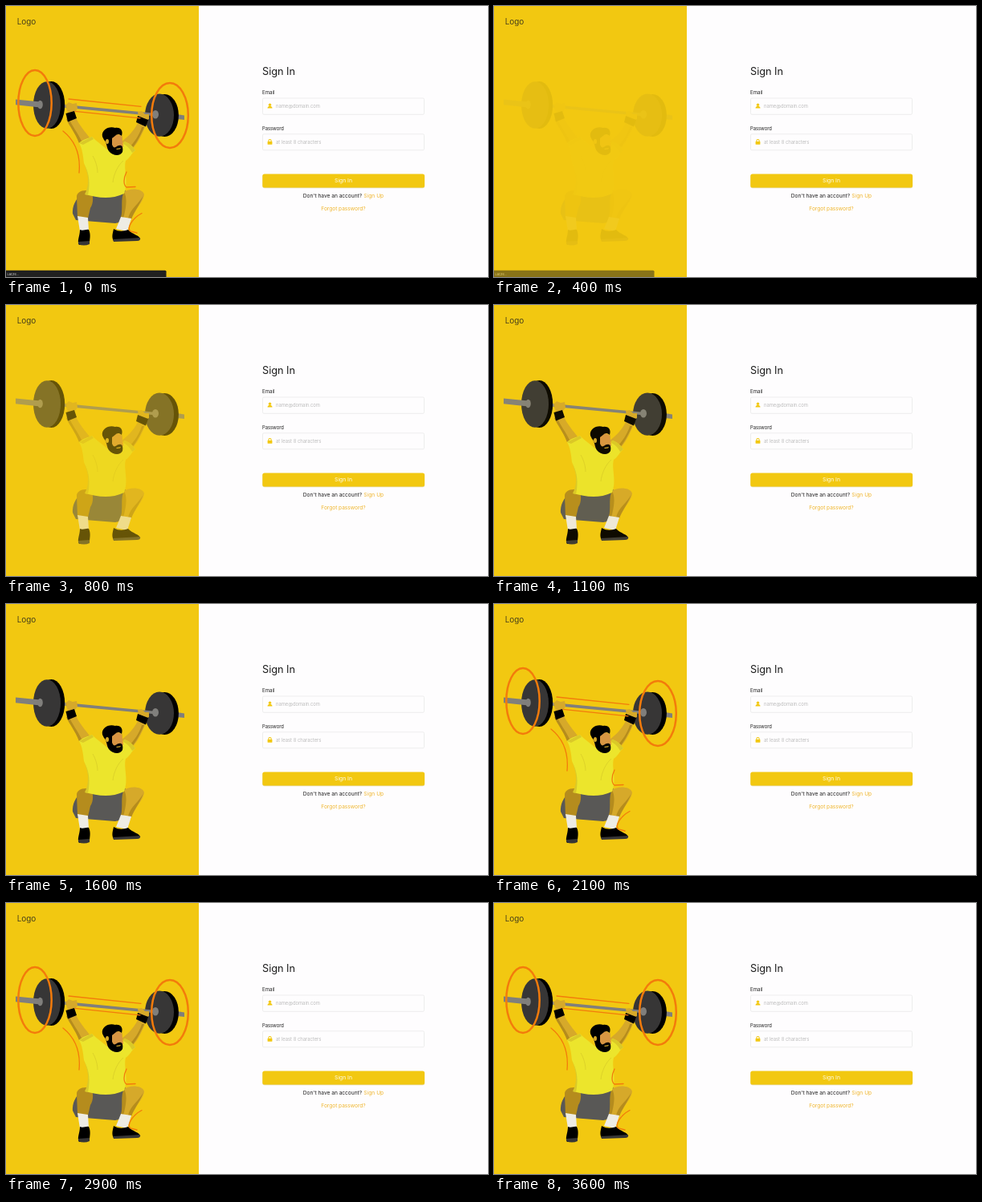
Write an HTML page that moves like this. It is 600 px wide and 338 px high and loops after 3.7 s.

```html
<!DOCTYPE html>
<html lang="en">
<head>
<meta charset="utf-8">
<title>Sign In</title>
<style>
  html, body { margin: 0; width: 100%; height: 100%; overflow: hidden; background: #fefdfe; }
  svg { display: block; width: 100vw; height: 100vh; }
  text { font-family: Inter, "Open Sans", sans-serif; fill: #1d1d1d; }
  .hint { fill: #bcbcbc; font-size: 5.85px; }
  .link { fill: #efb52b; }
  .field { fill: #fefdfe; stroke: #ebebeb; stroke-width: .9; }
  .gold { fill: #f2c811; }
  .skin { fill: #d6a92a; }
  .shade { fill: #b58c1d; }
  .plate { fill: #373636; }
  .steel { fill: #807f7c; }
  .sock { fill: #eeece4; }
  #effort { fill: none; stroke: #f37b0b; stroke-width: 1.3; stroke-linecap: round; }
  #effort ellipse { stroke-width: 2.5; }
</style>
</head>
<body>
<svg viewBox="0 0 600 338" preserveAspectRatio="none">
  <rect width="600" height="338" fill="#fefdfe"/>
  <rect class="gold" width="240" height="338"/>
  <text x="13.7" y="23.2" font-size="10" font-weight="300">Logo</text>

  <g id="lifter">
    <!-- barbell -->
    <path class="steel" d="M213 135 222 136.5V142L213 141Z"/>
    <ellipse cx="56.5" cy="123.5" rx="16.7" ry="29.5"/>
    <ellipse class="plate" cx="51" cy="123.5" rx="17" ry="29.2"/>
    <path class="steel" d="M12 116.5 40 119.2V126.2L12 123.2Z"/>
    <ellipse class="steel" cx="42.5" cy="123" rx="3.3" ry="5.2"/>
    <ellipse cx="197.5" cy="136.5" rx="17.4" ry="26.5"/>
    <ellipse class="plate" cx="191" cy="136.2" rx="18" ry="26.6"/>
    <path class="steel" d="M73 123 185 133.7V137.2L73 126.8Z"/>
    <ellipse class="steel" cx="186" cy="135.3" rx="4" ry="5.2"/>
    <!-- arms -->
    <path class="skin" d="M75 139C79 148 86 157 91 171L106 167C99 157 91 149 87 139Z"/>
    <path class="skin" d="M164 146C159 156 152 163 144 169L155 181C162 174 169 162 174 148Z"/>
    <path class="shade" d="M75 141C79 150 86 158 91 171L95 170C89 158 82 149 78 140ZM172 151C167 163 161 173 155 180L152 178C160 170 166 161 169 151Z"/>
    <path class="skin" d="M74 124 78 120 83 122 88 121 89 128 86 132 77 133ZM164 132 169 131 173 135 178 135 178 141 174 143 165 139Z"/>
    <path d="M74.5 134 85 131 88 140 77 144.5ZM164 137 177 142 174 150.5 162 145Z"/>
    <!-- legs and shorts -->
    <path fill="#595856" d="M98 231C88 238 82 249 83 259L87 267 111 269 136 271C148 269 156 261 158 247L147 228Z"/>
    <path class="shade" d="M106 231C96 228 88 232 88 238L89 264 102 265 105 252C109 246 109 237 106 231Z"/>
    <path class="skin" d="M147 232C153 227 170 227 172 235C171 244 161 253 156 266L143 264C147 253 143 243 147 232Z"/>
    <path class="shade" d="M147 232C151 239 150 250 146 265L143 264C146 252 142 241 147 232ZM171 236C168 246 160 255 156 266L152 265C155 252 165 248 171 236Z"/>
    <path class="sock" d="M89 262 102 264 103 280 92 281ZM143 263 156 265 151 281 137 278Z"/>
    <path d="M92 279C96 281 100 278 103 279C106 285 104 291 104 296L91 298C88 293 92 287 92 279ZM134 278C141 282 146 281 152 279C157 285 167 286 167 291L134 293C131 288 133 283 134 278Z"/>
    <path class="plate" d="M90 294 104 293V297Q97 300 90 297ZM133 291 167 289Q168 293 163 293L134 294Z"/>
    <!-- shirt -->
    <path fill="#ece52c" d="M91 171C96 166 103 165 107 163C112 168 120 174 126 179L145 178 147 169C152 170 158 175 161 180C156 184 154 190 149 193C146 204 153 219 147 234C130 242 113 239 99 235C106 222 102 207 97 196C96 187 95 178 91 171Z"/>
    <path fill="#dac928" d="M91 171 107 163 109 166 96 173ZM147 169C152 170 158 175 161 180L157 183C154 177 150 174 146 172ZM97 197C104 208 105 222 102 236L98 235C105 221 102 207 97 197Z"/>
    <path fill="none" stroke="#d8cd29" stroke-width=".8" d="M146 193C139 199 134 210 133 220M108 187C112 194 114 202 114 208"/>
    <!-- head -->
    <path class="skin" d="M122 165C126 159 142 154 145 163L145 179C142 188 131 184 126 178Z"/>
    <path fill="#d79543" d="M131 163C136 159 143 160 144 164L146 176 136 178 130 172Z"/>
    <path d="M120 163C118 154 129 149 136 152C143 151 146 156 144 162C138 157 136 163 132 165L132 173C135 180 137 174 141 174C145 173 146 178 145 182C142 188 133 187 128 181C125 177 126 170 122 167Z"/>
    <ellipse class="skin" cx="126" cy="169" rx="2" ry="3"/>
    <path class="skin" d="M137 178 143 177 142 178.5 138 179Z"/>
  </g>

  <g id="effort">
    <ellipse cx="36" cy="121" rx="20.7" ry="41"/>
    <ellipse cx="204" cy="136.5" rx="22.8" ry="40.5"/>
    <path d="M78 116 168 125.3M86 131.3 167 139.8M71 156C86 168 93 186 91 208M150 207C146 215 146 223 150 226L161 225.5M169 258.5C157 265 150 277 155 281L163 283"/>
  </g>

  <text x="319" y="86" font-size="12.7">Sign In</text>
  <text x="319" y="109.6" font-size="6.1">Email</text>
  <rect class="field" x="319.5" y="115" width="201" height="20.3" rx="1.5"/>
  <path class="gold" d="M325.5 127.5C325.5 123.8 331.5 123.8 331.5 127.5Z"/>
  <circle class="gold" cx="328.5" cy="123.2" r="1.7"/>
  <text class="hint" x="336" y="127.2">name@domain.com</text>
  <text x="319" y="154.5" font-size="5.8">Password</text>
  <rect class="field" x="319.5" y="159.8" width="201" height="20" rx="1.5"/>
  <rect class="gold" x="325.6" y="169" width="5.8" height="3.8" rx=".6"/>
  <path d="M326.9 169.3V168C326.9 166 330.1 166 330.1 168V169.3" fill="none" stroke="#f2c811" stroke-width="1.1"/>
  <text class="hint" x="336" y="172">at least 8 characters</text>
  <rect x="319.3" y="210" width="201.8" height="17.3" rx="2.5" fill="#e6dcb0"/>
  <rect class="gold" x="319.3" y="209.5" width="201.8" height="17" rx="2.5"/>
  <text x="420" y="220.4" font-size="6.8" text-anchor="middle" style="fill:#fffdf0">Sign In</text>
  <text x="369.8" y="239.2" font-size="6.6">Don't have an account?</text>
  <text class="link" x="445.3" y="239.2" font-size="6.7">Sign Up</text>
  <text class="link" x="420" y="254.6" font-size="6.55" text-anchor="middle">Forgot password?</text>

  <g id="status">
    <path fill="#202020" d="M0 329.8H198Q199.5 329.8 199.5 331.3V338H0Z"/>
    <text x="1.5" y="335.6" font-size="4" style="fill:#d8d8d8">Lacze...</text>
  </g>
</svg>
<script>
  const LOOP = 3700, STEP = 100, RELOAD = 250;
  const [lifter, effort, status_] = ["lifter", "effort", "status"].map(id => document.getElementById(id));

  const ramp = (t, from, to) => Math.min(1, Math.max(0, (t - from) / (to - from)));
  const ease = u => u * u * (3 - 2 * u);

  function draw(now) {
    const t = Math.floor(now % LOOP / STEP) * STEP;
    const before = t < RELOAD;
    lifter.style.opacity = before ? 1 : ease(ramp(t, RELOAD, 1250));
    effort.style.opacity = before ? 1 : ease(ramp(t, 1650, 2100));
    status_.style.opacity = 1 - ramp(t, 300, 500);
  }

  const start = performance.now();
  function tick() {
    draw(performance.now() - start);
    requestAnimationFrame(tick);
  }
  tick();
</script>
</body>
</html>
```
